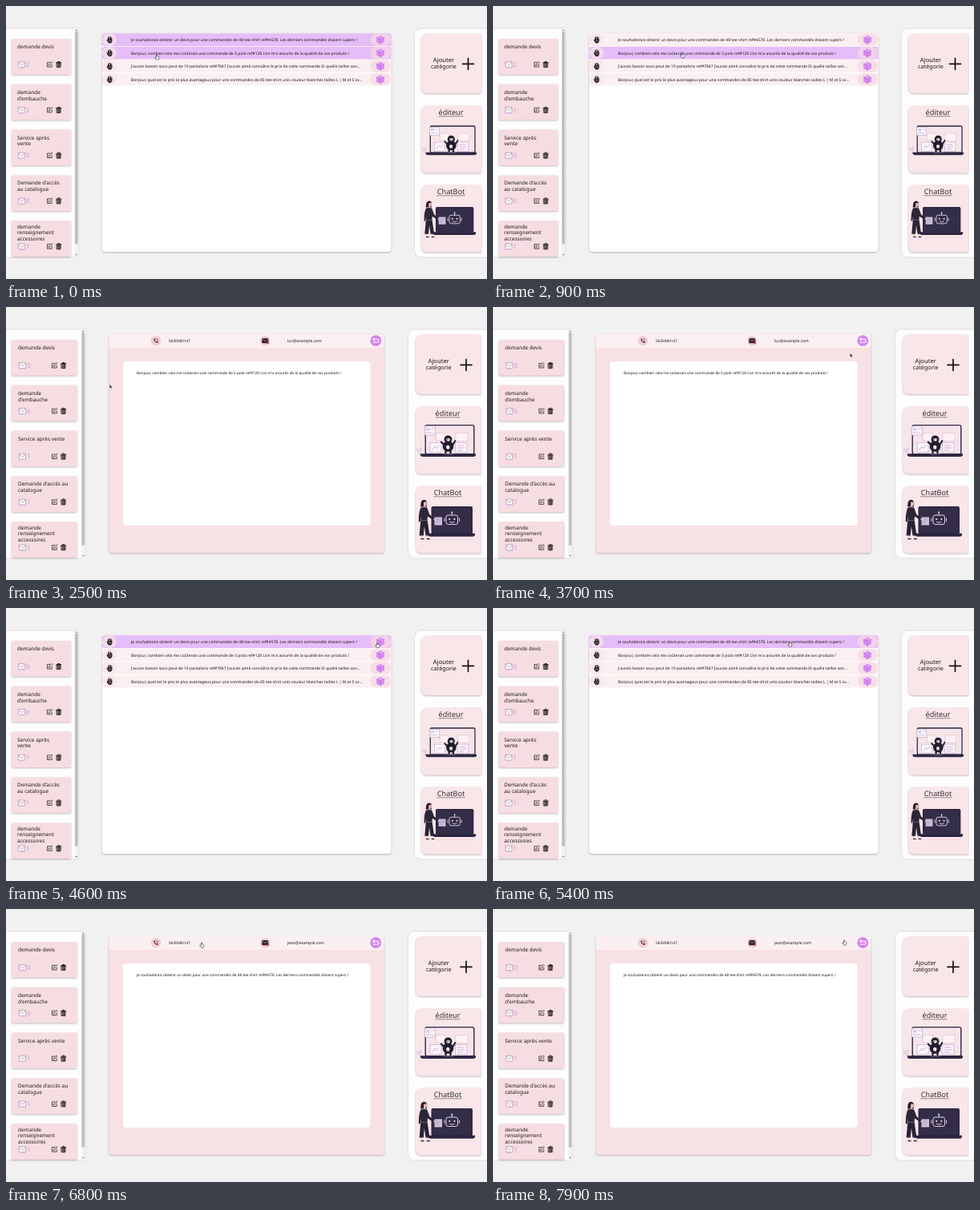
Recreate the animation shown at these times as an HTML page. Size 600x341 px, loop 8 s.

```html
<!DOCTYPE html>
<html lang="fr">
<head>
<meta charset="utf-8">
<style>
html, body { margin: 0; width: 100%; height: 100%; overflow: hidden; background: #f2f1f2; }
svg { display: block; width: 600px; height: 341px; }
text { font-family: 'Noto Sans', sans-serif; fill: #1c1819; text-rendering: geometricPrecision; }
.card { filter: drop-shadow(.9px 1.1px .8px rgba(70, 40, 50, .32)); }
.panel { filter: drop-shadow(0 .5px 1px rgba(60, 50, 60, .22)); }
.mid { text-anchor: middle; }
.num { font-size: 7.8px; fill: #cf92ea; }
</style>
</head>
<body>
<svg id="stage" viewBox="0 0 600 341"></svg>
<script>
const LOOP = 8000, STEP = 100;
const INK = '#2e2842', LILAC = '#d9cdea', PINK = '#f6dde1', SKIN = '#edb9b3';

const rect = (x, y, w, h, fill, more = '') =>
  `<rect x="${x}" y="${y}" width="${w}" height="${h}" fill="${fill}" ${more}/>`;
const path = (d, fill = 'none', stroke = 'none', width = 1) =>
  `<path d="${d}" fill="${fill}" stroke="${stroke}" stroke-width="${width}" stroke-linecap="round" stroke-linejoin="round"/>`;
const disc = (x, y, r, fill, more = '') => `<circle cx="${x}" cy="${y}" r="${r}" fill="${fill}" ${more}/>`;
const text = (x, y, size, str, more = '') => `<text x="${x}" y="${y}" font-size="${size}" ${more}>${str}</text>`;
const at = (x, y, body) => `<g transform="translate(${x} ${y})">${body}</g>`;

// Icons, each centred on 0,0
const envelope = rect(-4.2, -3.6, 8.4, 7, '#fdf4f6', 'rx=".8" stroke="#94899a" stroke-width=".6"') +
  path('M-4-3 0 .6 4-3', 'none', '#94899a', .6) + path('M-3.6 3.9H3.6', 'none', '#dcb4ee', 1);
const pencil = path('M0-2.6H-3V3H2.7V.4', 'none', '#2a2526', .8) +
  path('M-1.2 1.2-.8-.5 2.4-3.6 3.5-2.5 .4 .7Z', '#fae9ec', '#2a2526', .7);
const trash = path('M-3-2.4H3M-1-3.5H1', 'none', '#1d191a', 1) +
  path('M-2.5-1.6H2.5L2.2 3.6H-2.2Z', '#8a7c80', '#1d191a', .8) +
  path('M-.8-.9V3M.8-.9V3', 'none', '#1d191a', .6);
const palm = path('M-1.7 0V-2.8M-.3 0V-3.8M1.1 0V-3.5M2.5 0V-2.5M-2 1.8-3.3.2', 'none', '#171415', .95) +
  path('M-2-.4H2.9V1.6Q2.8 4 1 4.1H-.5Q-1.6 3.9-2.5 1.8Z', '#3a3436', '#171415', .6) +
  path('M-.6 1.2H1.6', 'none', '#b5a6aa', .6);
const cube = path('M0-5.4 4.9-2.8V2.8L0 5.4-4.9 2.8V-2.8Z', '#d68bf2') +
  path('M-4.9-2.8 0-.2 4.9-2.8M0-.2V5.4', 'none', '#b766dc', .6) +
  path('M-2.5-4.1 2.5-1.5', 'none', '#ecc8f9', .7);
const phone = disc(0, 0, 6.3, '#f3cdd6') +
  path('M-2.7-2.5Q-2.5 2 2.4 2.9L3 1.5 1.2.6.4 1.2Q-.9.5-1.3-.9L-.7-1.6-1.4-3Z', '#4c3440') +
  path('M.6-2.9Q2.9-2.5 3.1-.2M.5-1.4Q1.6-1.2 1.7 0', 'none', '#4c3440', .5);
const mail = disc(0, 0, 6.3, '#f3cdd6') + rect(-4, -3.1, 8, 6.2, '#2e2029', 'rx=".8"') +
  path('M-3.5-2.4 0 .5 3.5-2.4', 'none', '#f3cdd6', .6) + disc(3.4, 2.8, 1.3, '#c0436d');
const back = disc(0, 0, 6.9, '#d583ee') +
  path('M-3.6-1.9H2.2Q4 -1.8 3.9.2 3.8 2.1 2 2.1H-3.2M-1.8-3.6-3.6-1.9-1.8-.3', 'none', '#fff', 1.1);

// Laptop with small windows round a dark mascot
const frame = 'stroke="#b3a5c8" stroke-width=".6"', rosy = 'stroke="#dfb9c6" stroke-width=".6"';
const editor = path('M516.5 184Q512 181 512.4 177 515 178 515.7 181 515.8 177 517.5 175.5 518.8 180 516.5 184', '#f3e9f1', '#b9adc4', .5) +
  rect(523.2, 147.6, 60.6, 36, '#f7e4ea', `rx="1.8" stroke="${INK}" stroke-width="1.4"`) +
  path('M517 183.2H586V185.2Q585.5 186.9 583 186.9H520Q517.4 186.9 517 185.2Z', INK) +
  rect(546, 183.2, 12, 1.1, '#6a6284') +
  rect(522.2, 149, 13.5, 11, '#fbf5f9', frame) + rect(524, 151, 4.5, 3.5, LILAC) +
  path('M524 157H533M530.5 152H534', 'none', '#a99ac0', .6) +
  rect(536.5, 157.5, 12, 9.5, '#fdf3f5', rosy) + rect(561, 157.5, 15, 10, '#fdf3f5', rosy) +
  rect(529, 169.5, 14, 12, '#fbf5f9', frame) + rect(560.5, 169.5, 14.5, 12, '#fbf5f9', frame) +
  path('M532 178.5 535 174 537 176.5 540 173M563 173H571M563 176H572M563 179H569', 'none', '#b98fc4', .7) +
  path('M546 172 542.8 168.5M557.5 172 560.3 167', 'none', '#211d2e', 2) +
  disc(551.5, 165.3, 4.9, '#211d2e') + disc(551.5, 174, 6.8, '#211d2e') +
  path('M548.5 180V182M554.5 180V182', 'none', '#211d2e', 2.4) +
  path('M549 165Q551.5 162.8 554.5 165 554 167.6 551.7 167.8 549.5 167.5 549 165Z', '#f5ecf2') +
  path('M549 174Q551 171.5 553.5 174L553 177.5H549.7Z', '#f5ecf2') +
  disc(550.6, 165.6, .6, '#211d2e') + disc(553, 165.6, .6, '#211d2e');

// Presenter beside a dark laptop
const chatbot = rect(530.5, 249, 51.5, 34.5, INK, 'rx="2"') + rect(532.3, 250.8, 48, 31, '#332d48') +
  path('M526.5 282.8H585V285Q584.5 286.8 582 286.8H529.5Q527 286.8 526.5 285Z', '#2a2440') +
  path('M514 290.3H583', 'none', '#e9c9d2', .5) +
  rect(549, 260, 14.5, 11.5, 'none', 'rx="2.5" stroke="#efe6f3" stroke-width=".9"') +
  path('M556.2 260V257.3M547 264V267.5M565.5 264V267.5M553.5 268.5Q556 270.4 559 268.5', 'none', '#efe6f3', .9) +
  disc(556.2, 256.6, 1, '#efe6f3') + disc(553.2, 265, 1.1, '#efe6f3') + disc(559.4, 265, 1.1, '#efe6f3') +
  rect(534.5, 262.5, 9.5, 10, '#cfc3dd') + path('M536 265H542M536 267.3H542M536 269.6H540', 'none', '#8e82a6', .5) +
  path('M518.5 285V289M525.6 285V289', 'none', SKIN, 1.3) + path('M518 289.7H521M525.3 289.7H528.3', 'none', '#1d1929', 1.2) +
  path('M517.3 248Q517.2 240.8 521.5 240.8 525.4 241 525.3 246L524.8 249.5H517Z', '#241f31') +
  path('M521.2 243.5H525V247Q524.6 248.7 522.8 248.6V251H521V247Z', SKIN) +
  path('M517.5 250.5Q521.5 249.4 525.2 250.5L528.3 259 534 264.3 532.8 266 526 261.6 525.5 266.5H517.5L517.6 261 516.8 268H514.8Q514.6 256 517.5 250.5Z', '#2c2638') +
  path('M517.3 266.5H525.7L528.5 285.5H523.5L521.8 274 520.8 285.5H515.6Z', '#292335') +
  path('M517.5 266.6H525.6', 'none', '#6d6378', .6) + disc(534.3, 265.3, 1, SKIN) + disc(515.8, 268.8, .9, SKIN);

const titles = [
  ['demande devis'], ['demande', "d'embauche"], ['Service après vente'],
  ["Demande d'accès au", 'catalogue'], ['demande', 'renseignement', 'accessoires']
];
// Titles that wrap differently on narrow cards
const narrow = { 2: ['Service après', 'vente'], 3: ["Demande d'accès", 'au catalogue'] };
const mails = [
  'Je souhaiterais obtenir un devis pour une commandes de 48 tee-shirt ref#4578. Les derniers commandés étaient supers !',
  "Bonjour, combien cela me coûterais une commande de 5 polo ref#128 L'on m'a assurés de la qualité de vos produits !",
  "J'aurais besoin sous peut de 19 pantalons ref#7847 J'aurais aimé connaître le prix de cette commande Et quelle tailles son...",
  'Bonjour, quel est le prix le plus avantageux pour une commandes de 85 tee-shirt unis couleur blanches tailles L | M et S sv...'
];

function leftPanel(wide) {
  const w = wide ? 81.5 : 74, bar = wide ? 94 : 85.5, tx = wide ? 15 : 14;
  let out = rect(-6, 28.5, bar + 10.5, 285, '#fefdfe', 'class="panel" rx="3"') +
    rect(bar, 28.5, 4.6, 285, '#f3f2f3') + rect(bar + .5, 32, 3.6, 265.5, '#bfbebf') +
    path(`M${bar + 1.1} 310H${bar + 3.5}L${bar + 2.3} 311.5ZM${bar + 1.1} 31H${bar + 3.5}L${bar + 2.3} 29.5Z`, '#555');
  titles.forEach((t, i) => {
    const y = 41 + 56.8 * i;
    const lines = !wide && narrow[i] || t;
    const top = y + (lines.length > 2 ? 9.4 : 12);
    out += rect(7, y, w, 44.5, PINK, 'class="card" rx="1.5"') +
      lines.map((s, k) => text(tx, top + 7.8 * k, 6.45, s)).join('') +
      at(wide ? 20.5 : 19.5, y + 32.2, envelope) +
      text(wide ? 26.2 : 25, y + 34.8, 7.8, '', `class="num" data-i="${i}"`) +
      at(wide ? 60.5 : 54.5, y + 32, pencil) + at(wide ? 71.7 : 65.8, y + 32, trash);
  });
  return out;
}

function rightPanel(wide) {
  const x = wide ? 511 : 518, w = wide ? 81.5 : 75, mid = wide ? 551 : 555;
  const box = (y, h) => {
    const r = x + w, b = y + h;
    return `<g class="card">${path(`M${x + 8} ${y}H${r - 1}Q${r} ${y} ${r} ${y + 1}V${b}H${x + 8}Q${x} ${b} ${x} ${b - 8}V${y + 8}Q${x} ${y} ${x + 8} ${y}Z`, '#f9e6e9')}</g>`;
  };
  const art = (cy, body) => wide ? body :
    `<g transform="translate(555.3 ${cy + .8}) scale(.92) translate(-551.5 ${-cy})">${body}</g>`;
  const label = (y, s, half) => text(mid, y, 9.1, s, 'class="mid" style="fill:#332e31"') +
    path(`M${mid - half} ${y + 1.8}H${mid + half}`, 'none', '#4a4346', .6);
  const cx = wide ? 539.7 : 546, px = wide ? 574 : 576.5;
  return rect(wide ? 502 : 510, 28.5, 110, 285, '#fefdfe', 'class="panel" rx="8"') +
    box(34.5, 74.5) + box(124.5, 84) + box(223.5, 84) +
    text(cx, 69.8, 7.6, 'Ajouter', 'class="mid"') + text(cx, 77.8, 7.2, 'catégorie', 'class="mid"') +
    path(`M${px - 7} 72.3H${px + 7}M${px} 65.3V79.3`, 'none', '#151213', 1.7) +
    label(136, 'éditeur', 15) + label(235, 'ChatBot', 17.3) + art(167.5, editor) + art(265.5, chatbot);
}

function inbox() {
  const pill = 'rx="7.6" opacity=".75"';
  let out = rect(120, 34, 360.5, 273, '#fff', 'class="card" rx="4"');
  mails.forEach((s, i) => {
    const y = 34.2 + 16.5 * i;
    out += rect(120, y, 360.5, 15.8, '#fbf0f1', 'rx="3"') +
      rect(120, y, 360.5, 15.8, '#e5bdf8', 'class="hover" rx="3"') +
      rect(120, y + .3, 18, 15.2, '#f7e4e8', pill) + rect(454.5, y + .3, 25.5, 15.2, '#f6d8e1', pill) +
      at(129.2, y + 7.9, palm) + text(156, y + 9.8, 4.99, s) + at(467, y + 8, cube);
  });
  return out;
}

const message = () =>
  rect(128.5, 34, 343, 273, '#f8e1e5', 'class="card" rx="3"') + rect(128.5, 34, 343, 17, '#fbf0f1', 'rx="3"') +
  rect(146, 68, 308.5, 205, '#fff', 'rx="4"') +
  at(187, 42.2, phone) + at(323.3, 42.2, mail) + at(461.3, 42.2, back) +
  text(203, 44.1, 4.72, '0639980147') + text(351, 44.1, 5, '', 'id="sender"') + text(163, 84, 4.67, '', 'id="body"');

const arrow = path('M0 0V4.6L1.1 3.6 1.9 5.2 2.6 4.9 1.9 3.3H3.3Z', '#111', '#fff', .3);
const hand = path('M-.6 3.2V.5Q0-.4.6.5V2.4L2.6 3Q3 3.2 2.9 4.2L2.4 6.6H-.7L-2.3 4.2Q-2.4 3.4-1.5 3.6L-.6 4.3Z', '#fff', '#222', .55);

const $ = id => document.getElementById(id);
$('stage').innerHTML = rect(0, 0, 600, 341, '#f2f1f2') +
  `<g id="list">${leftPanel(false) + rightPanel(false) + inbox()}</g>` +
  `<g id="detail">${leftPanel(true) + rightPanel(true) + message()}</g>` +
  `<g id="cursor"><g id="arrow">${arrow}</g><g id="hand">${hand}</g></g>`;
const hovers = document.querySelectorAll('.hover'), nums = document.querySelectorAll('.num');

// Pointer path: time, x, y
const track = [
  [0, 188, 60.5], [900, 236, 58], [1100, 237, 58], [1600, 205, 72], [1700, 205, 72], [2500, 129.3, 97], [2700, 129.3, 97],
  [3300, 320, 80], [3400, 320, 80], [3700, 445.5, 58], [4300, 462, 42], [4400, 462, 42], [4600, 463, 43],
  [5300, 385, 42], [5500, 355, 41], [5600, 355, 41], [6300, 244, 41.5], [6900, 244, 41.5], [7000, 252, 42],
  [7200, 252, 42], [7600, 400, 42], [7700, 400, 42], [7900, 438, 38.5]
];
function pointer(t) {
  const i = track.findIndex(p => p[0] > t);
  if (i < 0) return track[track.length - 1].slice(1);
  const [t0, x0, y0] = track[i - 1], [t1, x1, y1] = track[i];
  const k = (t - t0) / (t1 - t0);
  return [x0 + (x1 - x0) * k, y0 + (y1 - y0) * k];
}
const show = (el, on) => el.style.display = on ? '' : 'none';

function draw(t) {
  const open = t >= 1000 && t < 4500 || t >= 6700;
  const late = t >= 4500, pointing = t < 1200 || t >= 4000;
  show($('list'), !open);
  show($('detail'), open);
  show($('hand'), pointing);
  show($('arrow'), !pointing);
  $('cursor').setAttribute('transform', `translate(${pointer(t)})`);
  hovers[0].style.opacity = late ? 1 : Math.max(0, 1 - t / 300);
  hovers[1].style.opacity = late ? 0 : 1;
  hovers[2].style.opacity = hovers[3].style.opacity = 0;
  $('sender').textContent = late ? 'jean@example.com' : 'luc@example.com';
  $('body').textContent = mails[late ? 0 : 1];
  const counts = t < 1800 ? '21001' : t < 7000 ? '00111' : '00101';
  nums.forEach(n => n.textContent = counts[n.dataset.i]);
}

const start = performance.now();
function tick() {
  const t = (performance.now() - start) % LOOP;
  draw(Math.floor(t / STEP) * STEP);
  requestAnimationFrame(tick);
}
draw(0);
requestAnimationFrame(tick);
</script>
</body>
</html>
```
